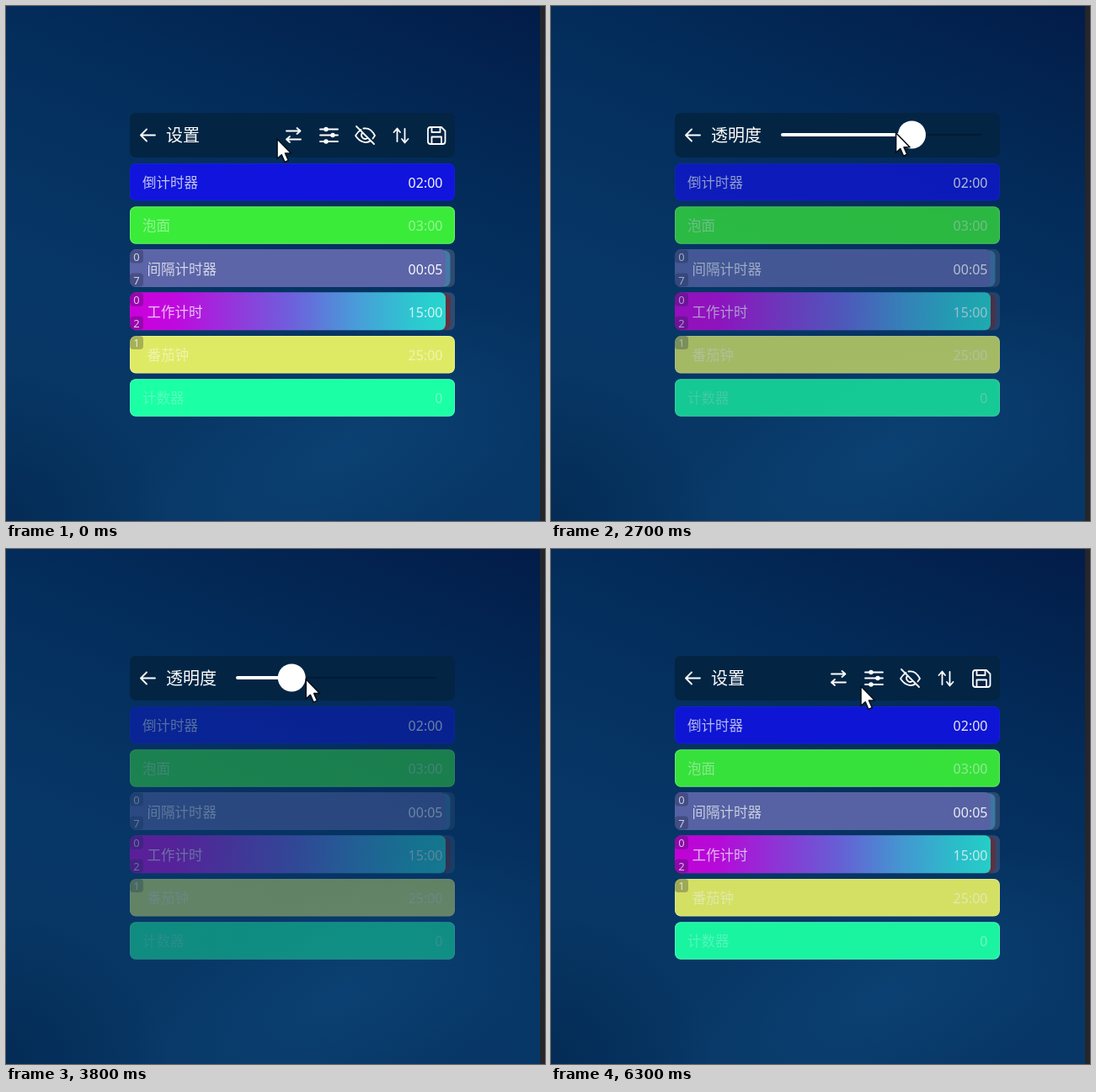
These frames come from a looping animation (640 by 612 pixels, 6.4 s). An HTML page:

```html
<!DOCTYPE html>
<html lang="zh">
<head>
<meta charset="utf-8">
<style>
  html, body { margin: 0; width: 100%; height: 100%; overflow: hidden; background: #05305f; }
  svg { display: block; width: 100vw; height: 100vh; }
  text { font: 16.5px "Noto Sans CJK SC", "Noto Sans CJK", sans-serif; fill: #fff; }
  .num { font: 16px "Noto Sans", sans-serif; text-anchor: end; }
  .badge { font: 13px "Noto Sans", sans-serif; text-anchor: middle; fill-opacity: .75; }
  .title { font-size: 20px; }
  .line { fill: none; stroke: #fff; stroke-width: 1.8; stroke-linecap: round; stroke-linejoin: round; }
</style>
</head>
<body>
<svg viewBox="0 0 640 612">
  <defs>
    <linearGradient id="sky" gradientUnits="userSpaceOnUse" x1="590" y1="-20" x2="330" y2="612">
      <stop offset="0" stop-color="#031c48"/>
      <stop offset=".35" stop-color="#032c5a"/>
      <stop offset=".75" stop-color="#073767"/>
      <stop offset="1" stop-color="#083765"/>
    </linearGradient>
    <radialGradient id="glow" gradientUnits="userSpaceOnUse" cx="0" cy="0" r="1"
      gradientTransform="translate(400 530) rotate(-25) scale(300 130)">
      <stop offset="0" stop-color="#0c4577" stop-opacity=".7"/>
      <stop offset="1" stop-color="#0c4577" stop-opacity="0"/>
    </radialGradient>
    <radialGradient id="corner" gradientUnits="userSpaceOnUse" cx="0" cy="612" r="190">
      <stop offset="0" stop-color="#02264f" stop-opacity=".7"/>
      <stop offset="1" stop-color="#02264f" stop-opacity="0"/>
    </radialGradient>
    <linearGradient id="work">
      <stop offset="0" stop-color="#cc00dc"/>
      <stop offset=".14" stop-color="#c008df"/>
      <stop offset=".32" stop-color="#9634dc"/>
      <stop offset=".52" stop-color="#6c62dc"/>
      <stop offset=".73" stop-color="#46a0d8"/>
      <stop offset=".9" stop-color="#2cc8d0"/>
      <stop offset="1" stop-color="#28d6cc"/>
    </linearGradient>
  </defs>

  <rect width="640" height="612" fill="url(#sky)"/>
  <rect width="640" height="612" fill="url(#glow)"/>
  <rect width="640" height="612" fill="url(#corner)"/>
  <rect x="634" width="6" height="612" fill="#24262b"/>

  <rect x="147" y="127" width="386" height="53" rx="7" fill="#042442" fill-opacity=".92"/>
  <path class="line" d="M177 153.500H160M167 146.500L160 153.500L167 160.500" stroke-width="2"/>
  <text class="title" id="title" x="190" y="161"></text>

  <g id="icons" class="line">
    <path d="M333 148.500H349M345.500 145L349.500 148.500L345.500 152M350 158.500H333M337 155L333 158.500L337 162"/>
    <path d="M373 146.500H394M373 153.500H394M373 161H394"/>
    <g fill="#fff" stroke="none">
      <circle cx="380" cy="146.500" r="2.700"/><circle cx="388" cy="153.500" r="2.700"/><circle cx="380" cy="161" r="2.700"/>
    </g>
    <path d="M416 143L437 164M421.500 147C418.500 149 416.500 151.500 415 154C420 162 428 164 433 160M424.500 145.500C430 144.500 435 148 438 154L435.500 157.500M422.500 151.500A4.500 4.500 0 0 0 428.500 157.500"/>
    <path d="M464.500 161V146M460.500 150L464.500 145.500L468 150M473.500 146V162M470 158L473.500 162.500L477.500 158"/>
    <path d="M504 144H517L521.500 148.500V161Q521.500 164 518.500 164H504Q501 164 501 161V147Q501 144 504 144ZM505.500 144.500V150H515.500V144.500M505.500 163.500V155.500H517V163.500"/>
  </g>

  <g id="slider">
    <path d="M273 153H511" stroke="#021a33" stroke-width="2"/>
    <path id="fill" stroke="#fff" stroke-width="4" stroke-linecap="round"/>
    <circle id="thumb" cy="153" fill="#fff"/>
  </g>

  <g id="rows"></g>
  <path id="cursor" d="M0 0V23.500L5.200 18.800L9 27.500L13.300 25.500L9.500 17H16.500Z"
    fill="#fff" stroke="#06101c" stroke-width="1.600" stroke-linejoin="round"/>
</svg>

<script>
const $ = id => document.getElementById(id);

// label, value, colour, label opacity, value opacity, badges, stripe colour
const timers = [
  ['倒计时器', '02:00', '#1014dc', .75, .95, []],
  ['泡面', '03:00', '#3aec39', .45, .48, []],
  ['间隔计时器', '00:05', '#5c65a8', .75, .95, ['0', '7'], '#427ba5'],
  ['工作计时', '15:00', 'url(#work)', .75, .78, ['0', '2'], '#66303f'],
  ['番茄钟', '25:00', '#dfea64', .48, .5, ['1']],
  ['计数器', '0', '#1bffa5', .28, .4, []]
];

const box = (x, y, w, h, fill, rx = 7, extra = '') =>
  `<rect x="${x}" y="${y}" width="${w}" height="${h}" rx="${rx}" fill="${fill}" ${extra}/>`;

$('rows').innerHTML = timers.map(([label, value, colour, labelAlpha, valueAlpha, badges, stripe], i) => {
  const y = 187 + i * 51.25;
  const bar = stripe
    ? box(147, y - .5, 386, 45, '#3a5275', 7, 'fill-opacity=".8"') + box(480, y + 1, 47.5, 43, stripe) +
      box(147, y - .5, 375, 45, colour)
    : box(147, y, 386, 44.5, colour) +
      box(147.5, y + .5, 385, 43.5, 'none', 7, `stroke="#fff" stroke-opacity="${i ? .25 : .04}"`);
  const marks = badges.map((mark, k) => {
    const top = y + k * 28;
    return box(147, top, 16, 16, '#10182c', 4, 'fill-opacity=".27"') +
      `<text class="badge" x="155" y="${top + 13}">${mark}</text>`;
  }).join('');
  return bar + marks +
    `<text x="${badges.length ? 167.500 : 162}" y="${y + 29}" fill-opacity="${labelAlpha}">${label}</text>` +
    `<text class="num" x="518.500" y="${y + 29}" fill-opacity="${valueAlpha}">${value}</text>`;
}).join('');

// time, x, y
const cursorPath = [
  [0, 322, 158], [500, 380, 158], [900, 382, 158], [1500, 450, 160], [2000, 481, 158],
  [2200, 504, 153], [2400, 490, 152], [2900, 356, 150], [3500, 311, 152], [3650, 300, 153],
  [4200, 506, 159], [4900, 500, 159], [5400, 170, 153], [5800, 168, 153], [6300, 368, 163], [6400, 372, 161]
];
// time, thumb x
const thumbPath = [
  [0, 508], [2300, 508], [2500, 482], [2900, 375], [3500, 319], [3700, 302], [4200, 488], [4300, 492], [6400, 492]
];
// time, thumb radius
const radiusPath = [[0, 11], [2100, 11], [2300, 16.500], [4400, 16.500], [4600, 11], [6400, 11]];

function at(path, t, column = 1) {
  const i = path.findIndex(key => key[0] > t);
  const a = path[i - 1], b = path[i];
  return a[column] + (b[column] - a[column]) * (t - a[0]) / (b[0] - a[0]);
}

function draw() {
  const t = Math.floor(performance.now() % 6400 / 100) * 100;
  const adjusting = t >= 800 && t < 5800;
  const x = at(thumbPath, t);

  $('title').textContent = adjusting ? '透明度' : '设置';
  $('icons').style.display = adjusting ? 'none' : '';
  $('slider').style.display = adjusting ? '' : 'none';
  $('fill').setAttribute('d', `M275 153H${x}`);
  $('thumb').setAttribute('cx', x);
  $('thumb').setAttribute('r', at(radiusPath, t));
  $('rows').setAttribute('opacity', .2 + .8 * (x - 273) / 235);
  $('cursor').setAttribute('transform', `translate(${at(cursorPath, t)} ${at(cursorPath, t, 2)})`);
  requestAnimationFrame(draw);
}
draw();
</script>
</body>
</html>
```
